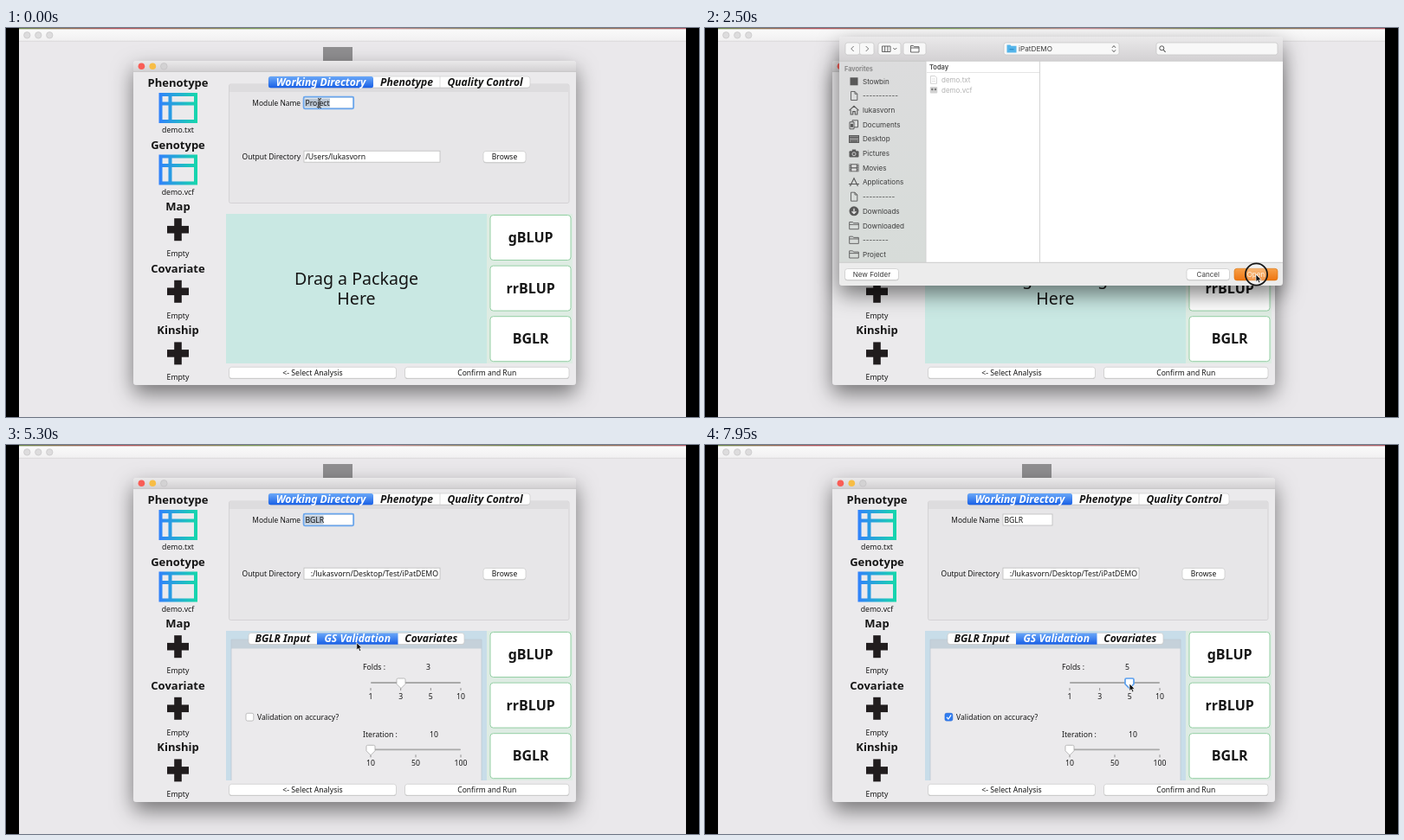
An HTML page for the animation above (8 s loop, 800 by 450 pixels).

```html
<!DOCTYPE html>
<html lang="en">
<head>
<meta charset="utf-8">
<title>Module setup</title>
<style>
  html, body { margin: 0; width: 100%; height: 100%; overflow: hidden; background: #000; }
  svg { display: block; width: 800px; height: 450px; }
  text { font-family: "Noto Sans", "Open Sans", sans-serif; fill: #161616; white-space: pre; }
  .b { font-weight: 700; }
  .i { font-weight: 700; font-style: italic; }
  .ui { font-family: Inter, Roboto, sans-serif; fill: #3c3c3c; }
  .ub { font-family: Inter, Roboto, sans-serif; font-weight: 600; fill: #4a4a4a; }
</style>
</head>
<body>
<svg id="stage" viewBox="0 0 800 450" xmlns="http://www.w3.org/2000/svg"></svg>
<script>
const LOOP = 8000;
const USER = 'lukasvorn';
const NAVY = '#c8dde9', MINT = '#c9e8e3', GREEN = '#94cfa4', BLUE = '#4a94ea';

// markup helpers
const rect = (x, y, w, h, fill, more = '') =>
  `<rect x="${x}" y="${y}" width="${w}" height="${h}" fill="${fill}" ${more}/>`;
const dot = (x, y, r, fill, more = '') =>
  `<circle cx="${x}" cy="${y}" r="${r}" fill="${fill}" ${more}/>`;
const line = (d, color, w = 1, more = '') =>
  `<path d="${d}" fill="none" stroke="${color}" stroke-width="${w}" ${more}/>`;
const text = (x, y, s, size, anchor = 'start', cls = '', more = '') =>
  `<text x="${x}" y="${y}" font-size="${size}" text-anchor="${anchor}" class="${cls}" ${more}>${s}</text>`;
const mid = (x, y, s, size, cls, more) => text(x, y, s, size, 'middle', cls, more);
const group = (id, body, more = '') => `<g id="${id}" ${more}>${body}</g>`;
const grad = (id, a, b, dir = 'x2="0" y2="1"') =>
  `<linearGradient id="${id}" ${dir}><stop stop-color="${a}"/><stop offset="1" stop-color="${b}"/></linearGradient>`;

const button = (x, y, w, h, label, size = 8.5, cls = '') =>
  rect(x, y + .7, w, h, '#bdbdbd', 'rx="3"') +
  rect(x, y, w, h, '#fff', 'rx="3" stroke="#c9c9c9" stroke-width=".7"') +
  mid(x + w / 2, y + h / 2 + 3.1, label, size, cls);
const field = (x, y, w) =>
  rect(x, y, w, 13, '#fff', 'stroke="#bcbcbc" stroke-width=".8"');
const glow = (id, x, y, w, h, r) =>
  rect(x, y, w, h, 'none', `id="${id}" rx="${r}" stroke="#6ba7ee" stroke-width="1.8"`);

// tabs: [label, left, right]
function tabs(y, items, active) {
  const x0 = items[0][1], x1 = items.at(-1)[2];
  let s = rect(x0, y + .6, x1 - x0, 13, '#bfbfbf', 'rx="3"') +
          rect(x0, y, x1 - x0, 13, '#fdfdfd', 'rx="3" stroke="#c6c6c6" stroke-width=".6"');
  items.forEach(([label, l, r], k) => {
    const on = k === active;
    if (on) s += rect(l, y, r - l, 13.2, 'url(#tab)', k ? '' : 'rx="2.5"');
    else if (k > active + 1) s += line(`M${l} ${y}v13`, '#d4d4d4', .8);
    s += mid((l + r) / 2, y + 10.8, label, 12.1, 'i', on ? 'style="fill:#fff"' : '');
  });
  return s;
}

const tableIcon = y =>
  `<g fill="none" stroke="url(#table)" stroke-width="4">` +
  `<path d="M178.5 ${y + 2}H219V${y + 33}H178.5ZM178.5 ${y + 12.5}H219M189.5 ${y + 2}V${y + 33}"/></g>`;
const plusIcon = y =>
  rect(186, y - 4.3, 25, 8.6, '#211d1e') + rect(194.2, y - 13, 8.6, 26, '#211d1e');

function inputs() {
  return ['Phenotype', 'Genotype', 'Map', 'Covariate', 'Kinship'].map((name, k) => {
    const y = 68 + k * 71.6;
    const file = ['demo.txt', 'demo.vcf'][k];
    return mid(198.5, y, name, 13, 'b') +
      (file ? tableIcon(y + 7) : plusIcon(y + 22)) +
      mid(198.5, y + 53, file || 'Empty', 8.7);
  }).join('');
}

const packages = ['gBLUP', 'rrBLUP', 'BGLR'].map((name, k) => {
  const y = 216.5 + k * 58.6;
  return rect(559, y, 93, 52, '#fff', `id="pkg${k}" rx="3.5"`) + mid(605.7, y + 31.6, name, 16, 'b');
}).join('');

function slider(id, y, ticks, x) {
  const step = 104 / (ticks.length - 1);
  return rect(421, y - .9, 104, 1.8, '#a9a9a9', 'rx=".9"') +
    ticks.map((n, k) => line(`M${421 + k * step} ${y + 6}v3`, '#777', .8) +
      mid(421 + k * step, y + 18.6, n, 8.7)).join('') +
    `<path id="${id}" d="M-5 -3.5Q-5 -5 -3.5 -5H3.5Q5 -5 5 -3.5V1.5L0 6.5L-5 1.5Z" fill="#fff" stroke="#aaa" stroke-width=".8" transform="translate(${x} ${y})"/>`;
}

const validation =
  rect(254, 215, 301, 173, NAVY) +
  rect(260, 225, 289, 163, '#ebeaec') + rect(260, 225, 289, 10.5, '#c5d1da') +
  line('M260 388V225H549V388', '#bccad3', .8) +
  tabs(217.5, [['BGLR Input', 280, 359], ['GS Validation', 359, 452.5], ['Covariates', 452.5, 529]], 1) +
  rect(277, 310.3, 8.8, 8.8, '#fff', 'id="box" rx="1.8" stroke-width=".7"') +
  line('M279 314.8l1.9 2.2 3.2-4.7', '#fff', 1.3, 'id="tick"') +
  text(290, 318, 'Validation on accuracy?', 8.6) +
  text(412, 260.3, 'Folds :', 8.7) + mid(487.5, 260.3, '3', 8.7, '', 'id="folds"') +
  slider('thumb', 275, [1, 3, 5, 10], 456) +
  text(412, 338, 'Iteration :', 8.7) + mid(494, 338, '10', 8.7) +
  slider('thumb2', 352.3, [10, 50, 100], 421);

const setup =
  rect(147, 38, 511, 375, '#ebeaec', 'rx="4" filter="url(#shade)"') +
  `<path d="M147 50V42q0-4 4-4H654q4 0 4 4V50Z" fill="url(#bar)"/>` +
  line('M147 50.4H658', '#bdbcbd', .8) +
  dot(156.4, 44.3, 3.8, '#f95d56') + dot(169.3, 44.3, 3.8, '#f7bd45') +
  dot(182.3, 44.3, 3.8, '#d3d2d3', 'stroke="#bfbebf" stroke-width=".6"') +
  inputs() +
  rect(257.5, 65, 392.5, 137.5, '#e7e6e8', 'rx="2" stroke="#d2d1d3" stroke-width=".9"') +
  rect(258, 65.5, 391.5, 8.5, '#dddcde') +
  tabs(56, [['Working Directory', 303, 424], ['Phenotype', 424, 501], ['Quality Control', 501, 605]], 0) +
  text(340, 90, 'Module Name', 8.4, 'end') + field(344, 80, 57) +
  rect(345, 81.5, 29, 10, '#b9c5d3', 'id="mark"') +
  glow('nameGlow', 343.6, 79.7, 57.6, 13.6, 1.5) +
  text(345.5, 90, '', 8.6, 'start', '', 'id="name"') +
  line('M366.5 81.7v9.6', '#111', .9, 'id="caret"') +
  text(340, 152.2, 'Output Directory', 8.5, 'end') + field(344, 142.2, 157) +
  text(345.5, 152.2, '/Users/' + USER, 8.7, 'start', '', 'id="home"') +
  text(499, 152.2, `:/${USER}/Desktop/Test/iPatDEMO`, 8.72, 'end', '', 'id="path"') +
  button(551, 142.5, 49, 13, 'Browse') + glow('browseGlow', 551, 142.3, 49, 13.6, 3) +
  rect(555, 215, 99, 173, '#deece3') + packages +
  rect(254, 215, 301, 173, MINT, 'id="drop"') +
  group('hint', mid(404.5, 297, 'Drag a Package', 19.6) + mid(404.5, 320, 'Here', 19.6)) +
  group('chosen', mid(404.5, 285, 'BGLR', 19.6) + mid(404.5, 308, 'Selected', 19.6) +
    mid(404.5, 331, '(Tap for details)', 19.6)) +
  group('panel', validation) +
  button(257.5, 392.3, 193, 13, '&lt;- Select Analysis', 8.7) +
  button(460.5, 392.3, 189.5, 13, 'Confirm and Run');

// sidebar glyphs, drawn around 0,0
const INK = '#585858';
const glyph = {
  square: rect(-4.5, -4.5, 9, 9, INK),
  doc: line('M-3.5-5H1L3.8-2.2V5H-3.5ZM1-5V-2.2H3.8', INK, .9),
  home: line('M-5.5 .3L0-4.8L5.5 .3M-3.8-.5V4.8H-1.3V1.5H1.3V4.8H3.8V-.5', INK, 1.1),
  docs: line('M-5-3H0V5H-5ZM-2-3V-5H4.5V3H0', INK, 1) + rect(-4, -1, 3, 4, INK),
  desk: rect(-5.5, -4, 11, 8, '#8a8a8a', `stroke="${INK}"`) + line('M-5-2H5M-4 2.4H4', INK, 1.2),
  photo: rect(-5.5, -3, 11, 7.4, INK, 'rx="1"') + rect(-2.2, -4.6, 4.4, 3, INK) + dot(0, .6, 2, INK, 'stroke="#ddd" stroke-width=".9"'),
  film: rect(-5.5, -4.5, 11, 9, INK, 'rx=".6"') + rect(-2.8, -3.6, 5.6, 3, '#ddd') + rect(-2.8, .6, 5.6, 3, '#ddd') +
    line('M-4.3-4V4M4.3-4V4', '#ddd', 1, 'stroke-dasharray="1.2 1"'),
  apps: line('M-4.5 4.5L0-4.8L4.5 4.5M-6 2H6', INK, 1.1),
  down: dot(0, 0, 5.5, INK) + line('M0-3V2.6M-2.4 .4L0 2.8L2.4 .4', '#e6e6e6', 1.3),
  folder: line('M-5.3 4.2V-4H-1.5L-.5-2.8H5.3V4.2ZM-5.3-1.2H5.3', INK, .9)
};
const places = [
  ['square', 'Stowbin'], ['doc', '-----------'], ['home', USER], ['docs', 'Documents'],
  ['desk', 'Desktop'], ['photo', 'Pictures'], ['film', 'Movies'], ['apps', 'Applications'],
  ['doc', '----------'], ['down', 'Downloads'], ['folder', 'Downloaded'], ['folder', '--------'],
  ['folder', 'Project']
].map(([icon, label], k) => {
  const y = 61.8 + k * 16.67;
  return `<g transform="translate(172 ${y})">${glyph[icon]}</g>` + text(182, y + 3, label, 8.1, 'start', 'ui');
}).join('');

const chip = (x, w) => rect(x, 17, w, 14, '#f8f8f8', 'rx="2.5" stroke="#c5c4c5" stroke-width=".7"');
const pale = 'style="fill:#b2b2b2"';
const chooser =
  rect(155, 10, 512, 288, '#ececec', 'rx="4" filter="url(#shade)"') +
  `<path d="M155 38V14q0-4 4-4H663q4 0 4 4V38Z" fill="url(#bar)"/>` +
  rect(155, 38, 100, 233, 'url(#side)') + rect(255, 38, 412, 233, '#fff') +
  line('M155 38.3H667M155 271.3H667', '#c4c3c4', .8) +
  line('M255 38V271M386.5 38V271', '#d0d0d0', .9) +
  chip(162, 16.5) + chip(178.5, 16.5) + chip(200, 26) + chip(229, 26) + chip(345, 133) + chip(521, 140) +
  line('M171.7 21l-3 3 3 3M185.7 21l3 3-3 3', '#777', 1) +
  line('M204.5 21h9.5v6.5h-9.5ZM207.7 21v6.5M210.9 21v6.5M217.3 23l2 2 2-2', '#555', .9) +
  line('M237.5 28V20.5h3l1 1.2h5.5V28ZM237.5 23h9.5', '#555', .9) +
  `<path d="M348.5 28.5V19.5h4l1 1.3h6v7.7Z" fill="#55b5ea"/>` +
  line('M351.5 24.7h5', '#2f8fc9', 1.3) +
  text(362, 27, 'iPatDEMO', 8.2, 'start', 'ui') +
  line('M470 22.8l2-2.3 2 2.3M470 25.4l2 2.3 2-2.3', '#555', 1) +
  dot(527.3, 23.3, 2.5, 'none', 'stroke="#555"') + line('M529.2 25.3l2.4 2.5', '#555', 1.1) +
  text(161, 50.3, 'Favorites', 7.4, 'start', 'ub', 'style="fill:#808080"') + places +
  text(259, 47.6, 'Today', 7.5, 'start', 'ub') + line('M256 51.5H386', '#ddd', .8) +
  text(273, 63, 'demo.txt', 8, 'start', 'ui', pale) + text(273, 74.8, 'demo.vcf', 8, 'start', 'ui', pale) +
  line('M260.5 55.5h5l2 2v6.8h-7Z', '#c4c4c4', .7) + line('M262 59h4M262 61.5h4', '#d5d5d5', .7) +
  rect(259.8, 68, 8.5, 7.5, '#d2d2d2', 'rx="1"') + dot(262.3, 71, 1.2, '#777') + dot(266, 71, 1.2, '#777') +
  button(161.5, 278.5, 62, 13, 'New Folder', 8.1, 'ui') +
  button(556, 278.5, 49.5, 13, 'Cancel', 8.1, 'ui') +
  rect(611, 278.3, 50, 13.6, 'url(#open)', 'rx="3" stroke="#d9730f" stroke-width=".6"') +
  mid(636, 288, 'Open', 8.1, 'ui', 'style="fill:#fff3e0"');

const stage = document.getElementById('stage');
stage.innerHTML =
  '<defs>' + grad('bar', '#eae9ea', '#d3d1d3') + grad('tab', '#6ba8f8', '#175fe6') +
  grad('side', '#dcdcdd', '#d7dcd9') + grad('open', '#f7a048', '#ee7511') +
  grad('top', '#fafafa', '#f1f0f1') +
  '<linearGradient id="table" gradientUnits="userSpaceOnUse" x1="177" x2="221"><stop stop-color="#3182fb"/><stop offset="1" stop-color="#16d8ab"/></linearGradient>' +
  '<linearGradient id="wall"><stop stop-color="#6e8a4a"/><stop offset=".15" stop-color="#b5545d"/><stop offset=".35" stop-color="#7f9a58"/><stop offset=".55" stop-color="#c78b92"/><stop offset=".75" stop-color="#728a4c"/><stop offset="1" stop-color="#b4606c"/></linearGradient>' +
  '<filter id="shade" x="-20%" y="-20%" width="140%" height="150%"><feDropShadow dx="0" dy="10" stdDeviation="12" flood-opacity=".5"/></filter></defs>' +
  rect(0, 0, 800, 450, '#000') + rect(15, 0, 770, 2, 'url(#wall)') +
  rect(15, 1.5, 770, 449, '#eae8eb') + rect(15, 1.5, 770, 13.5, 'url(#top)') +
  line('M15 15.2H785', '#d0cfd0', .7) +
  [24.3, 37.3, 50.3].map(x => dot(x, 8.3, 3.7, '#dddcdd', 'stroke="#c6c5c6" stroke-width=".7"')).join('') +
  rect(366, 22, 34, 34, '#8f8e90') +
  setup + group('chooser', chooser) +
  dot(0, 0, 12.6, '#fff', 'id="ring" fill-opacity=".25" stroke="#161616" stroke-width="1.8"') +
  group('beam', line('M-2-5.5Q0-5.5 0-4V4Q0 5.5-2 5.5M2-5.5Q0-5.5 0-4M0 4Q0 5.5 2 5.5', '#333', 1)) +
  group('arrow', '<path d="M0 0V8.6L2 6.8L3.4 10L5 9.3L3.6 6.2H6.2Z" fill="#111" stroke="#fff" stroke-width=".7"/>');

const el = {};
stage.querySelectorAll('[id]').forEach(n => el[n.id] = n);
const show = (id, on) => el[id].setAttribute('display', on ? 'inline' : 'none');
const put = (id, x, y) => el[id].setAttribute('transform', `translate(${x} ${y})`);
const within = (t, a, b) => t >= a && t < b;

// pointer stops: time, x, y
const route = [
  [0, 362, 87], [900, 362, 87], [1200, 535, 152], [1380, 575, 150], [1600, 575, 150],
  [1980, 495, 28], [2200, 495, 28], [2450, 636, 285], [2650, 636, 285], [2950, 667, 340],
  [3050, 667, 340], [3300, 606, 362], [3450, 606, 362], [4100, 399, 288], [4950, 399, 288],
  [5350, 405, 226], [5650, 405, 226], [6200, 319, 302], [6350, 319, 302], [6600, 281, 314],
  [6800, 281, 314], [7250, 456, 276], [7450, 456, 276], [7850, 490, 276], [8000, 490, 276]
];
const clicks = [1440, 2010, 2470, 4800, 5450, 6650];

function pointer(t) {
  const k = route.findIndex(p => p[0] > t);
  const [t0, x0, y0] = route[k - 1], [t1, x1, y1] = route[k];
  const u = (t - t0) / (t1 - t0), e = u * u * (3 - 2 * u);
  return [x0 + (x1 - x0) * e, y0 + (y1 - y0) * e];
}

function border(k, color, w) {
  el['pkg' + k].setAttribute('stroke', color);
  el['pkg' + k].setAttribute('stroke-width', w);
}

function update(t) {
  const [x, y] = pointer(t);
  const inName = x < 402 && t < 1200, typing = within(t, 400, 900);
  put('arrow', x, y);
  put('beam', x, y);
  put('ring', x + .5, y);
  show('beam', inName && !typing);
  show('arrow', !inName);
  show('ring', clicks.some(c => within(t, c, c + 160)));

  // module name
  const typed = Math.min(4, Math.floor((t - 400) / 130) + 1);
  const reselected = within(t, 5000, 6650);
  el.name.textContent = t < 400 ? 'Project' : 'BGLR'.slice(0, typed);
  show('mark', t < 400 || reselected);
  el.mark.setAttribute('width', t < 400 ? 29 : 21.5);
  show('nameGlow', t < 1450 || reselected);
  show('caret', within(t, 900, 1450) && t % 1000 < 500);

  // output directory
  const saved = t >= 2600;
  show('home', !saved);
  show('path', saved);
  show('chooser', within(t, 1600, 2600));
  show('browseGlow', within(t, 1450, 4100));

  // package choice
  const picked = within(t, 4100, 5000), open = t >= 5000;
  show('hint', t < 4100);
  show('chosen', picked);
  show('panel', open);
  el.drop.setAttribute('fill', t < 4100 ? MINT : NAVY);
  for (let k = 0; k < 3; k++) border(k, GREEN, 1);
  if (within(t, 2650, 3130)) border(1, '#111', 2.2);
  if (within(t, 3180, 4100)) border(2, '#111', 2.2);
  if (picked) border(2, BLUE, 1.8);

  // validation settings
  const checked = t >= 6700, held = t >= 7400;
  el.box.setAttribute('fill', checked ? '#2f7cf0' : '#fff');
  el.box.setAttribute('stroke', checked ? '#2468d8' : '#aaa');
  show('tick', checked);
  const knob = held ? x : 456;
  put('thumb', knob, 275);
  el.thumb.setAttribute('stroke', held ? '#5a9fee' : '#aaa');
  el.thumb.setAttribute('stroke-width', held ? 1.7 : .8);
  el.folds.textContent = knob > 473 ? 5 : 3;
}

const start = performance.now();
function frame(now) {
  update(Math.max(0, now - start) % LOOP);
  requestAnimationFrame(frame);
}
update(0);
requestAnimationFrame(frame);
</script>
</body>
</html>
```
